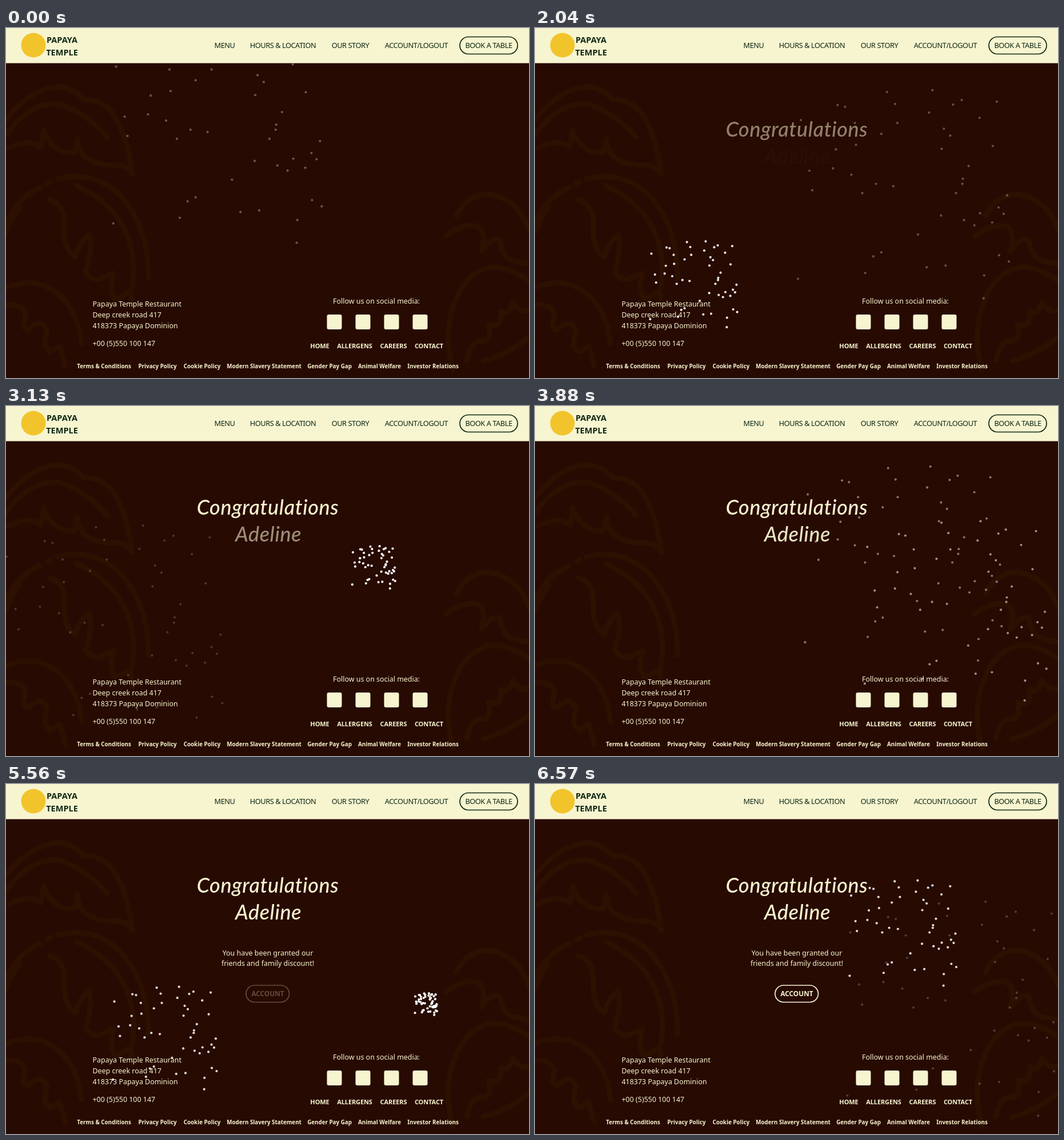
These frames come from a looping animation (915 by 612 pixels, 6.65 s). An HTML page with a canvas:

```html
<!DOCTYPE html>
<html lang="en">
<head>
<meta charset="utf-8">
<title>Congratulations</title>
<style>
html, body { margin: 0; width: 100%; height: 100%; overflow: hidden; background: #270a02; }
svg, canvas { position: absolute; left: 0; top: 0; width: 915px; height: 612px; }
text { font-family: "Noto Sans", sans-serif; font-size: 12.45px; fill: #f8f5d0; }
.mid text, text.mid { text-anchor: middle; }
.nav text { font-size: 12.8px; font-weight: 500; letter-spacing: -.45px; fill: #0f2712; }
.brand text { font-size: 14.5px; font-weight: 800; font-stretch: 75%; fill: #0f2712; }
.links text { font-size: 11px; font-weight: 700; letter-spacing: -.1px; }
.legal text { font-size: 9.8px; font-weight: 700; }
.script { font: italic 500 36px Lato, sans-serif; letter-spacing: .6px; }
.button text { font-size: 11.8px; font-weight: 700; }
.pill { fill: none; stroke-width: 1.7; }
.leaves { fill: none; stroke: #2d1100; stroke-width: 9; stroke-linecap: round; stroke-linejoin: round; }
</style>
</head>
<body>
<svg viewBox="0 0 915 612">
  <rect width="915" height="612" fill="#270a02"/>

  <g class="leaves">
    <!-- upper left -->
    <path d="M0 160Q45 103 95 103Q120 106 135 125Q175 125 192 158Q212 190 221 256"/>
    <path d="M0 187Q40 130 92 133Q140 148 177 191"/>
    <path d="M5 210Q40 192 61 208L66 178Q70 198 92 213Q112 222 120 216L125 194Q128 222 144 229Q158 237 170 238M178 240Q212 236 221 256"/>
    <!-- middle left -->
    <path d="M0 340Q20 296 60 279M72 272L78 269M90 264Q150 248 197 290Q250 345 249 436"/>
    <path d="M124 276Q185 304 210 357Q228 400 221 452M0 358Q10 330 24 314"/>
    <path d="M76 300Q103 308 102 345Q100 388 121 400Q127 377 145 362Q152 388 139 427Q150 442 163 439L188 429Q180 455 190 474Q205 470 218 460L221 490"/>
    <!-- lower left -->
    <path d="M0 454Q50 434 88 463Q126 492 132 552M0 484Q32 482 34 503Q26 525 38 528Q62 504 72 530Q62 560 78 566L94 556L104 592"/>
    <!-- right -->
    <path d="M788 329Q806 290 845 291Q895 298 915 352"/>
    <path d="M769 364Q797 342 822 346Q842 352 832 390Q850 364 864 371Q868 402 888 407L915 413"/>
    <path d="M782 598Q760 520 796 456Q822 418 858 418Q892 424 915 442"/>
    <path d="M806 582Q814 545 833 548Q852 546 844 518Q868 528 866 495Q880 506 886 480Q902 500 915 494M835 582Q880 570 915 540"/>
  </g>

  <rect width="915" height="61.5" fill="#f7f5d0"/>
  <circle cx="48" cy="30" r="21.5" fill="#f2c42c"/>
  <g class="brand mid"><text x="98" y="26">PAPAYA</text><text x="98" y="48">TEMPLE</text></g>
  <g class="nav mid" id="nav"></g>
  <rect class="pill" x="794" y="15.5" width="101" height="30" rx="15" stroke="#0f2712"/>

  <text class="script mid fade" x="458" y="190">Congratulations</text>
  <text class="script mid fade" x="459" y="237">Adeline</text>
  <g class="mid fade">
    <text x="458" y="299.5">You have been granted our</text>
    <text x="458" y="318.3">friends and family discount!</text>
  </g>
  <g class="button mid fade">
    <rect class="pill" x="420" y="352" width="75.5" height="29.5" rx="14.7" stroke="#f8f5d0"/>
    <text x="458" y="371">ACCOUNT</text>
  </g>

  <text x="151.5" y="487">Papaya Temple Restaurant</text>
  <text x="151.5" y="506">Deep creek road 417</text>
  <text x="151.5" y="525">418373 Papaya Dominion</text>
  <text x="151.5" y="556">+00 (5)550 100 147</text>
  <text class="mid" x="648" y="482">Follow us on social media:</text>
  <g id="social" fill="#f7f5d0"></g>
  <g class="links mid" id="links"></g>
  <g class="legal mid" id="legal"></g>
</svg>
<canvas id="sky" width="915" height="612"></canvas>

<script>
const $ = id => document.getElementById(id);
const SVG = "http://www.w3.org/2000/svg";

function add(parent, tag, attrs, text = "") {
  const el = document.createElementNS(SVG, tag);
  for (const key in attrs) el.setAttribute(key, attrs[key]);
  el.textContent = text;
  parent.append(el);
}

function row(id, y, items) {
  for (const [x, label] of items) add($(id), "text", { x, y }, label);
}

row("nav", 35, [[382.5, "MENU"], [484.5, "HOURS & LOCATION"], [602.5, "OUR STORY"],
  [718, "ACCOUNT/LOGOUT"], [844.5, "BOOK A TABLE"]]);
row("links", 560, [[549, "HOME"], [610, "ALLERGENS"], [678, "CAREERS"], [740, "CONTACT"]]);
row("legal", 594.5, [[171.5, "Terms & Conditions"], [265, "Privacy Policy"], [343, "Cookie Policy"],
  [451.5, "Modern Slavery Statement"], [566, "Gender Pay Gap"], [653.5, "Animal Welfare"],
  [747, "Investor Relations"]]);
for (let i = 0; i < 4; i++)
  add($("social"), "rect", { x: 561.5 + 50 * i, y: 501, width: 26, height: 26, rx: 3 });

// Spark directions as x, y pairs
const SPARKS = [
  -27,-324, 52,-327, -113,-301, -100,-298, -13,-303, 103,-310, 88,-302, 164,-307, 46,-288, 134,-279,
  -177,-275, -83,-270, -9,-270, -37,-251, 72,-260, 83,-248, 157,-230, -81,-232, -116,-224, 68,-225,
  115,-195, -121,-191, -162,-187, -89,-180, 105,-173, 104,-164, -46,-164, -16,-160, -157,-153, -70,-148,
  93,-148, 182,-144, 167,-123, 176,-112, 135,-113, 107,-101, 156,-97, 125,-92, 67,-109, 27,-76,
  -37,-45, -51,-38, -65,-9, 42,-19, 75,-22, 168,-40, 185,-29, 142,-5, 141,35, -182,1
];
const SPREAD = 1.064, FALL = 183, RADIUS = 2.1;
const WIDTH = 915, HEADER = 62;
// Burst places as fractions of the width: left, top
const PLACES = [[.4, .1], [.3, .4], [.7, .2], [.2, .3], [.8, .3]];

const LOOP = 6650, STEPS = 98;
// Fade start and length in ms, in page order
const FADES = [[1020, 2000], [2000, 2000], [4110, 1000], [5280, 1000]];
const faders = document.querySelectorAll(".fade");
const ctx = $("sky").getContext("2d");
ctx.fillStyle = "#fff";

// Cubic bezier (x1, 0, x2, 1)
function ease(x1, x2, p) {
  let lo = 0, hi = 1, s = .5;
  for (let i = 0; i < 24; i++) {
    s = (lo + hi) / 2;
    const r = 1 - s;
    if (3 * r * r * s * x1 + 3 * r * s * s * x2 + s * s * s < p) lo = s; else hi = s;
  }
  return s * s * (3 - 2 * s);
}

function drawBurst(time, period) {
  if (time < 0) return;
  const p = time / period % 1;
  const [left, top] = PLACES[Math.floor(time / period) % PLACES.length];
  const size = ease(0, .58, p) * SPREAD;
  const drop = ease(.42, 1, p);
  const x = left * WIDTH + 2.5, y = top * WIDTH + 124.5 + FALL * drop;
  ctx.globalAlpha = 1 - drop;
  for (let i = 0; i < SPARKS.length; i += 2) {
    ctx.beginPath();
    ctx.arc(x + SPARKS[i] * size, y + SPARKS[i + 1] * size, RADIUS, 0, 2 * Math.PI);
    ctx.fill();
  }
}

function render(t) {
  const step = Math.min(STEPS - 1, Math.floor(t * STEPS / LOOP + .2));
  const now = step * LOOP / STEPS;
  const clock = .793 + step / 14.85;

  FADES.forEach(([start, length], i) => {
    faders[i].style.opacity = Math.max(0, Math.min(1, (now - start) / length));
  });

  ctx.clearRect(0, 0, WIDTH, 612);
  ctx.save();
  ctx.beginPath();
  ctx.rect(0, HEADER, WIDTH, 612 - HEADER);
  ctx.clip();
  drawBurst(clock, 1);
  drawBurst(clock - 1.24, 1.25);
  ctx.restore();
}

const began = performance.now();
function tick() {
  render((performance.now() - began) % LOOP);
  requestAnimationFrame(tick);
}
tick();
</script>
</body>
</html>
```
